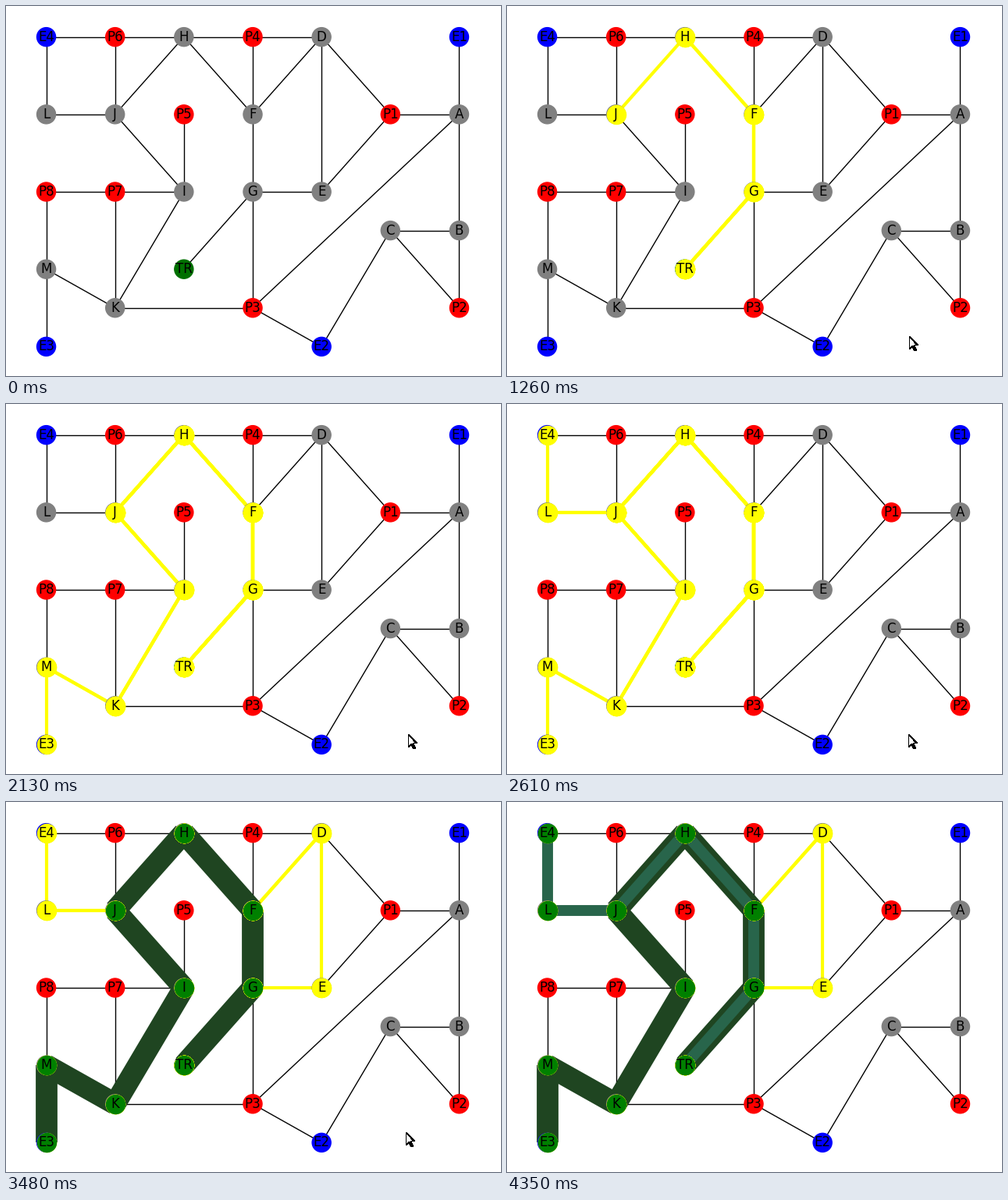
Animation of 634 by 474 pixels, one loop 5.41 s. Source, as a matplotlib script:

```python
import matplotlib.pyplot as plt
from matplotlib.animation import FuncAnimation
from matplotlib.collections import LineCollection
from matplotlib.patches import Polygon
import numpy as np

W, H, DPI = 634, 474, 100
LOOP, TICK = 5410, 10

# Grid cells: column from the left, row from the bottom
GRID = {
    "E4": (0, 8), "P6": (1, 8), "H": (2, 8), "P4": (3, 8), "D": (4, 8), "E1": (6, 8),
    "L": (0, 6), "J": (1, 6), "P5": (2, 6), "F": (3, 6), "P1": (5, 6), "A": (6, 6),
    "P8": (0, 4), "P7": (1, 4), "I": (2, 4), "G": (3, 4), "E": (4, 4),
    "C": (5, 3), "B": (6, 3), "M": (0, 2), "TR": (2, 2),
    "K": (1, 1), "P3": (3, 1), "P2": (6, 1), "E3": (0, 0), "E2": (4, 0),
}
EDGES = """E4-P6 P6-H H-P4 P4-D E4-L L-J J-P6 J-H H-F F-P4 F-D D-P1 D-E E-P1
P1-A A-E1 A-B A-P3 B-C B-P2 C-P2 C-E2 E2-P3 P3-K P3-G G-F G-E G-TR J-I I-P5
I-P7 I-K P7-K P7-P8 P8-M M-K M-E3""".split()

# Depth-first walk: when each path is marked
SEARCH = [
    (390, "TR"), (590, "TR G"), (790, "TR G F"), (990, "TR G F H"),
    (1260, "TR G F H J"), (1460, "TR G F H J I"), (1730, "TR G F H J I K"),
    (1930, "TR G F H J I K M"), (2130, "TR G F H J I K M E3"),
    (2410, "TR G F H J L"), (2610, "TR G F H J L E4"),
    (2810, "TR G F D"), (3010, "TR G F D E"), (3280, "TR G E"),
]
ROUTES = [
    (3480, "TR G F H J I K M E3", "#1f4521", 20),
    (3680, "TR G F H J L E4", "#28654b", 10),
]

# Pointer tip over time; None hides it
POINTER = [
    (0, None), (730, (535, 449)), (790, (516, 433)), (1060, (516, 430)),
    (1130, (515, 426)), (1190, (515, 423)), (2540, (514, 423)),
    (3080, (512, 423)), (4210, (510, 437)), (4280, (508, 451)), (4350, None),
]
ARROW = np.array([(0, 0), (0, 16), (4, 12.5), (6.5, 18), (8.5, 17),
                  (6, 11.5), (6, 11), (10.5, 11)])

STEP_X, STEP_Y = 640 / 1.21 / 6, 480 / 1.21 / 8
POS = {n: (51.54 + STEP_X * c, 436.35 - STEP_Y * r) for n, (c, r) in GRID.items()}

fig = plt.figure(figsize=(W / DPI, H / DPI), dpi=DPI, facecolor="white")
ax = fig.add_axes([0, 0, 1, 1])
ax.set_xlim(0, W)
ax.set_ylim(H, 0)
ax.axis("off")


def node_color(name):
    if name == "TR":
        return "#007000"
    if len(name) == 1:
        return "gray"
    return "red" if name[0] == "P" else "blue"


def draw_nodes(names, color):
    xs, ys = zip(*(POS[n] for n in names))
    return ax.scatter(xs, ys, s=300, c=color, linewidths=1, zorder=2)


def draw_edges(pairs, color, width):
    lines = [(POS[a], POS[b]) for a, b in pairs]
    return ax.add_collection(
        LineCollection(lines, colors=color, linewidths=width, zorder=1),
        autolim=False)


def draw_path(path, fill, color, width):
    names = path.split()
    return [draw_edges(zip(names, names[1:]), color, width),
            draw_nodes(names, fill)]


draw_edges([e.split("-") for e in EDGES], "black", 1)
draw_nodes(POS, [node_color(n) for n in POS])
for name, (x, y) in POS.items():
    ax.text(x, y, name, size=12, family="DejaVu Sans", color="black",
            ha="center", va="center", zorder=3)

marks = [(t, draw_path(p, "yellow", "yellow", 3)) for t, p in SEARCH]
marks += [(t, draw_path(p, "green", c, w)) for t, p, c, w in ROUTES]

pointer = ax.add_patch(Polygon(ARROW, facecolor="white", edgecolor="black",
                               linewidth=0.72, antialiased=False, zorder=4))


def update(i):
    now = i * TICK
    for start, artists in marks:
        for artist in artists:
            artist.set_visible(now >= start)
    tip = [p for t, p in POINTER if t <= now][-1]
    pointer.set_visible(tip is not None)
    if tip is not None:
        pointer.set_xy(ARROW + tip + 0.5)
    return []


anim = FuncAnimation(fig, update, frames=LOOP // TICK, interval=TICK,
                     init_func=lambda: update(0), repeat=True, repeat_delay=0)
plt.show()
```
